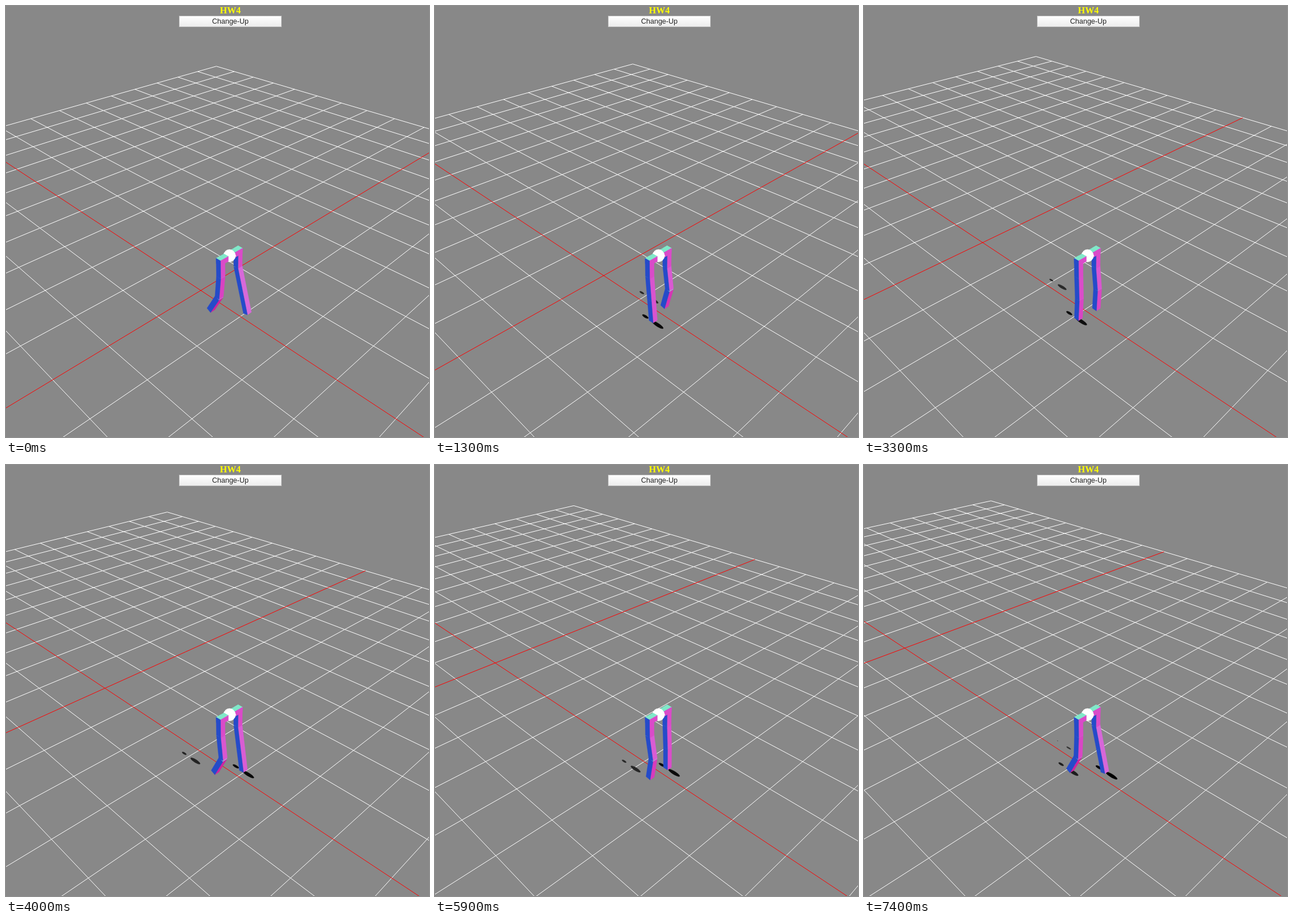
Write an HTML page with a canvas that moves like this. It is 741 by 756 pixels and loops after 7500 ms.

```html
<!DOCTYPE html>
<html lang="en">
<head>
<meta charset="utf-8">
<title>Walker</title>
<style>
  html, body { margin: 0; width: 100%; height: 100%; overflow: hidden; background: #888; }
  canvas { position: absolute; left: 0; top: 0; }
  h1, .button { position: absolute; margin: 0; text-align: center; }
  h1 { left: 304px; top: -1px; width: 178px; font: bold 16px/18px "Liberation Serif", "Times New Roman", serif; color: #ff0; }
  .button {
    left: 303px; top: 17px; width: 178px; height: 18px; border: 1px solid #b8b8b8;
    background: linear-gradient(#fff, #ececec); color: #222;
    font: 12.5px/18px "Liberation Sans", Arial, sans-serif;
  }
</style>
</head>
<body>
<canvas id="stage" width="741" height="756"></canvas>
<h1>HW4</h1>
<div class="button">Change-Up</div>
<script>
const ctx = document.getElementById('stage').getContext('2d');
const LOOP = 7500, FRAME = 100;
const CX = 391.5, CY = 438, FOCAL = 939.3, DIST = 86.6;
const R2 = Math.SQRT2, R3 = Math.sqrt(3), R6 = Math.sqrt(6);

// Gait: one step per STEP seconds, phase 0 = foot lands, phase 2 = lands again.
const FIRST = 0.1, STEP = 0.91;
const THIGH = 4.6, SHIN = 4.6, HIP = -3.1;
const travel = [[0, 7.37], [1.3, 14.76], [2.29, 20.5], [4, 37.92], [5.05, 48.63], [5.2, 49.5], [6.6, 57.75], [7.4, 62.3]];
const landings = [10.36, 15.5, 21.05, 30.25, 39.4, 48.9, 54.35, 59.7, 65];
// Rows are [phase, thigh angle, shin angle].
const slowGait = [
  [0, 15, 15], [0.14, 11, 11], [0.32, 4.4, 4.4], [0.48, -1.5, -7], [0.64, -5.5, -21.5], [0.89, -5.6, -28],
  [1.02, -3, -26], [1.14, 0, -23], [1.32, 8, -14], [1.64, 13.4, 13.4], [1.89, 15.2, 15.2], [2, 15, 15]
];
const fastGait = [
  [0, 17, 17], [0.286, 9.1, 9.1], [0.6, -2, -8], [0.9, -6, -28],
  [1.286, 6, -26], [1.6, 5.5, 5.5], [1.9, 16, 16], [2, 17, 17]
];

const mix = (a, b, k) => a + (b - a) * k;
const ramp = (t, a, b) => Math.min(1, Math.max(0, (t - a) / (b - a)));

function sample(rows, t, col = 1) {
  let i = 1;
  while (i < rows.length - 1 && rows[i][0] < t) i++;
  const a = rows[i - 1], b = rows[i];
  return mix(a[col], b[col], (t - a[0]) / (b[0] - a[0]));
}

// World coordinates are relative to the hips, which the camera follows.
const depth = p => DIST - (p[0] + p[1] + p[2]) / R3;
function project(p) {
  const k = FOCAL / depth(p);
  return [CX + (p[0] - p[2]) / R2 * k, CY - (2 * p[1] - p[0] - p[2]) / R6 * k];
}

function polygon(points, color) {
  ctx.beginPath();
  points.forEach(p => ctx.lineTo(...p));
  ctx.closePath();
  ctx.fillStyle = ctx.strokeStyle = color;
  ctx.lineWidth = 0.4;
  ctx.fill();
  ctx.stroke();
}

function normalColor([x, y, z]) {
  const view = [(x - z) / R2, (2 * y - x - z) / R6, (x + y + z) / R3];
  return `rgb(${view.map(v => Math.round(127.5 + 127.5 * v))})`;
}

function groundLine(a, b, color) {
  const near = 2, da = depth(a), db = depth(b);
  if (da < near && db < near) return;
  const cut = (p, q, dp, dq) => dp >= near ? p : p.map((v, i) => mix(v, q[i], (near - dp) / (dq - dp)));
  ctx.beginPath();
  ctx.moveTo(...project(cut(a, b, da, db)));
  ctx.lineTo(...project(cut(b, a, db, da)));
  ctx.strokeStyle = color;
  ctx.lineWidth = 1;
  ctx.stroke();
}

function drawGrid(x, h) {
  const pair = (v, color) => {
    groundLine([v - x, -h, -100], [v - x, -h, 100], color);
    groundLine([-100 - x, -h, v], [100 - x, -h, v], color);
  };
  for (let v = -100; v <= 100; v += 10) if (v) pair(v, '#fff');
  pair(0, '#f00');
}

function groundOval(x, z, rx, rz, h, color) {
  const points = [];
  for (let i = 0; i < 24; i++) {
    const a = i * Math.PI / 12;
    points.push(project([x + rx * Math.cos(a), -h, z + rz * Math.sin(a)]));
  }
  polygon(points, color);
}

function drawPrints(t, x, h) {
  landings.forEach((land, i) => {
    const age = t - FIRST - i * STEP;
    if (age < -1e-6) return;
    const z = i % 2 ? 2.45 : -1.6, shade = Math.round(Math.min(51, Math.max(0, age) * 30));
    const part = (dx, rx, rz, life, power) => {
      const left = 1 - (Math.max(0, age) / life) ** power;
      if (left <= 0) return;
      const size = Math.sqrt(left);
      groundOval(land - x + dx, z, rx * size, rz * size, h, `rgb(${shade},${shade},${shade})`);
    };
    part(-1.5, 0.7, 0.26, 1.85, 2);
    part(1.5, 1.3, 0.36, 1.93, 4);
  });
}

// Box hanging from (x, y), swung by angle in degrees about the z axis.
function box(x, y, length, z0, z1, angle = 0) {
  const s = Math.sin(angle * Math.PI / 180), c = Math.cos(angle * Math.PI / 180);
  const at = (u, v, z) => project([x + c * u + s * v, y + s * u - c * v, z]);
  const L = length, w = 0.5;
  const faces = [
    [[-s, c, 0], [[-w, 0, z0], [w, 0, z0], [w, 0, z1], [-w, 0, z1]]],
    [[c, s, 0], [[w, 0, z0], [w, L, z0], [w, L, z1], [w, 0, z1]]],
    [[0, 0, 1], [[-w, 0, z1], [w, 0, z1], [w, L, z1], [-w, L, z1]]]
  ];
  for (const [n, corners] of faces) polygon(corners.map(p => at(...p)), normalColor(n));
}

function drawLeg(z, phase, fast) {
  const angle = col => mix(sample(slowGait, phase, col), sample(fastGait, phase, col), fast);
  const a = angle(1), b = angle(2), r = a * Math.PI / 180;
  box(THIGH * Math.sin(r), HIP - THIGH * Math.cos(r), SHIN, z - 0.5, z + 0.5, b);
  box(0, HIP, THIGH, z - 0.5, z + 0.5, a);
  box(0, 0.5, 0.5 - HIP, z - 0.5, z + 0.5);
}

function drawBall() {
  const at = (i, j) => {
    const a = i * Math.PI / 4, b = j * Math.PI / 6;
    return project([-Math.cos(a) * Math.sin(b), Math.cos(b), Math.sin(a) * Math.sin(b)]);
  };
  for (let i = 0; i < 8; i++)
    for (let j = 0; j < 6; j++)
      polygon([at(i, j), at(i + 1, j), at(i + 1, j + 1), at(i, j + 1)], '#fff');
}

function draw(t) {
  const step = (t - FIRST) / STEP;
  const x = sample(travel, t);
  const h = 11.76 - 0.34 * Math.cos(2 * Math.PI * (step + 0.07));
  const fast = ramp(t, 2.5, 3) - ramp(t, 5.2, 5.6);

  ctx.fillStyle = '#888';
  ctx.fillRect(0, 0, 741, 756);
  drawGrid(x, h);
  drawPrints(t, x, h);
  drawLeg(-2, (step + 2) % 2, fast);
  box(0, 0.5, 1, -2.5, 0);
  drawBall();
  box(0, 0.5, 1, 0.75, 2.5);
  drawLeg(2, (step + 1) % 2, fast);
}

let shown = -1;
function tick() {
  const frame = Math.floor(performance.now() % LOOP / FRAME);
  if (frame !== shown) draw((shown = frame) * FRAME / 1000);
  requestAnimationFrame(tick);
}
tick();
</script>
</body>
</html>
```
